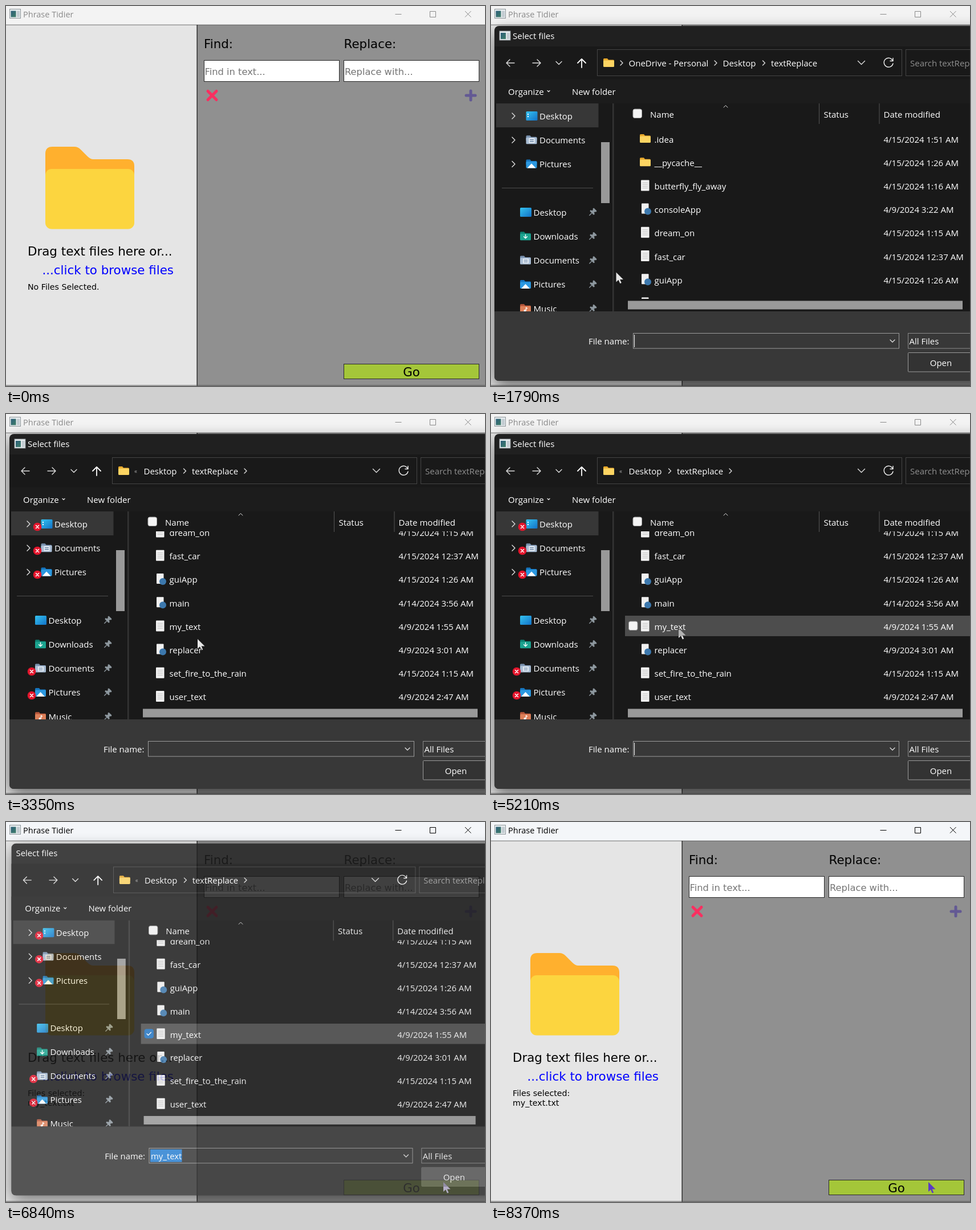
An HTML page that plays this animation: 840 px wide and 667 px high, repeating every 8440 ms.

```html
<!DOCTYPE html>
<html lang="en">
<head>
<meta charset="utf-8">
<title>Find and replace demo</title>
<style>
html, body { margin: 0; width: 100%; height: 100%; overflow: hidden; background: #e5e5e5; }
svg { display: block; width: 100vw; height: 100vh; }
.app text { font-family: "DejaVu Sans", sans-serif; font-size: 21.4px; }
.app .hint { font-size: 16.3px; fill: #757575; }
.app .small { font-size: 14.2px; }
.dlg text, .bar text { font-family: "Open Sans", "Noto Sans", sans-serif; font-size: 15px; }
.dlg text { fill: #fff; }
.bar text { font-size: 14.5px; }
.line { fill: none; stroke: #ddd; stroke-width: 1.4; stroke-linecap: round; stroke-linejoin: round; }
#cursor { mix-blend-mode: difference; fill: #fff; }
</style>
</head>
<body>
<svg id="stage" viewBox="0 0 840 667" preserveAspectRatio="none"></svg>
<script>
const LOOP = 8440;
const ROW = 41.2;

const rect = (x, y, w, h, fill, extra = '') =>
  `<rect x="${x}" y="${y}" width="${w}" height="${h}" fill="${fill}" ${extra}/>`;
const text = (x, y, s, extra = '') => `<text x="${x}" y="${y}" ${extra}>${s}</text>`;
const line = (d, extra = '') => `<path class="line" d="${d}" ${extra}/>`;
const group = (id, body, extra = '') => `<g id="${id}" ${extra}>${body}</g>`;
const right = (x, y, s = 4) => line(`M${x - s / 2} ${y - s}l${s} ${s}l${-s} ${s}`);
const down = (x, y, s = 5) => line(`M${x - s} ${y - s / 2}l${s} ${s}l${s} ${-s}`);

const windowIcon = (x, y) =>
  rect(x, y, 19, 16, '#e9eef0', 'stroke="#8d9599"') +
  rect(x + 2, y + 3, 9, 11, 'url(#teal)') + rect(x + 12.5, y + 3, 5, 11, '#c3ccd2');

const folder = (x, y, back = '#e8a92c', front = '#fcd462') =>
  `<path d="M${x} ${y + 1.5}q0-1.5 1.5-1.5h5.5l2 2.5h8.500q1.5 0 1.500 1.500v5h-19z" fill="${back}"/>` +
  rect(x, y + 3.5, 19, 11.500, front, 'rx="1.5"');

const sheet = (x, y) => rect(x, y, 14.5, 19, '#f1f1f1', 'rx="1"') +
  `<path d="M${x + 2.5} ${y + 5}h9.500m-9.500 3h9.500m-9.500 3h9.500m-9.500 3h9.500" stroke="#c2c2c2" fill="none"/>`;

const fileIcon = {
  dir: y => folder(261, y - 9),
  txt: y => sheet(263, y - 11),
  py: y => rect(264, y - 11, 12.500, 18, '#f1f1f1', 'rx="1"') +
    `<circle cx="275" cy="${y + 3}" r="6" fill="#3c78ad"/>`
};

const files = [
  ['dir', '.idea', '15/2024 1:51'], ['dir', '__pycache__', '15/2024 1:26'],
  ['txt', 'butterfly_fly_away', '15/2024 1:16'], ['py', 'consoleApp', '9/2024 3:22'],
  ['txt', 'dream_on', '15/2024 1:15'], ['txt', 'fast_car', '15/2024 12:37'],
  ['py', 'guiApp', '15/2024 1:26'], ['py', 'main', '14/2024 3:56'],
  ['txt', 'my_text', '9/2024 1:55'], ['py', 'replacer', '9/2024 3:01'],
  ['txt', 'set_fire_to_the_rain', '15/2024 1:15'], ['txt', 'user_text', '9/2024 2:47']
];
const PICKED = 8;

const fileRow = ([kind, name, date], i) => {
  const y = 234 + i * ROW;
  return fileIcon[kind](y) + text(286.5, y + 5.5, name) + text(688.5, y + 5.5, `4/${date} AM`);
};

const placeIcon = {
  Desktop: (x, y) => rect(x, y - 8, 20, 16, 'url(#sky)', 'rx="1.5"'),
  Documents: (x, y) => folder(x, y - 8, '#7890ad', '#a9bdd4') +
    rect(x + 5, y - 3, 10, 8, '#eef3f8') + line(`M${x + 7} ${y - .5}h6m-6 3h6`, 'style="stroke:#5f7da0"'),
  Pictures: (x, y) => folder(x, y - 8, '#1574bd', '#2b98e0') +
    `<path d="M${x + 2} ${y + 7}l7.500-8l7.500 8z" fill="#fff"/>`,
  Downloads: (x, y) => folder(x, y - 8, '#0d7f70', '#1ba38f') +
    line(`M${x + 9.5} ${y - 3}v6m-3-2.500l3 3l3-3`, 'style="stroke:#fff"'),
  Music: (x, y) => folder(x, y - 8, '#b5553a', '#dd8059') +
    `<circle cx="${x + 8.5}" cy="${y + 3.5}" r="2" fill="#fff"/>` +
    line(`M${x + 10.5} ${y + 3}v-5l2 1.500`, 'style="stroke:#fff"')
};

const place = (name, x, y) => placeIcon[name](x, y) + text(x + 23.5, y + 5.5, name);
const pin = y => `<g transform="translate(178 ${y}) rotate(45)" fill="#8d979e">` +
  rect(-4, -7, 8, 3, '#8d979e', 'rx="1"') + rect(-2.5, -5, 5, 5, '#8d979e') +
  rect(-5, -1, 10, 3, '#8d979e', 'rx="1"') + rect(-.7, 2, 1.4, 6, '#8d979e') + '</g>';
const badge = (x, y) => `<circle cx="${x}" cy="${y}" r="7.3" fill="#e3152c"/>` +
  line(`M${x - 2.5} ${y - 2.5}l5 5m0-5l-5 5`, 'style="stroke:#fff;stroke-width:1.6"');

const check = (x, y, fill, stroke) => rect(x, y, 15.500, 15.500, fill, `rx="3" stroke="${stroke}"`);

function appWindow() {
  const pane = group('pane',
    '<path d="M69 259q0-12 12-12h39q6 0 11 5l12 12q5 5 10 5h60q12 0 12 12v19h-156z" fill="#ffb02e"/>' +
    rect(69, 286, 156, 105.5, '#fcd53f', 'rx="11"') +
    text(38, 438, 'Drag text files here or...') +
    text(294, 471, '...click to browse files', 'text-anchor="end" style="fill:#00f"') +
    text(38, 498, 'No Files Selected.', 'class="small" id="status"') +
    text(38, 515, 'my_text.txt', 'class="small" id="chosen"'));
  const box = (x, y, h, fill) => rect(x, y, 237, h, fill, 'stroke="#2a2a2a"');
  return '<g class="app">' + rect(0, 33, 335, 634, '#e5e5e5') + rect(335, 33, 505, 634, '#909090') +
    rect(0, 32.5, 840, 1, '#4c4c4c') + rect(334.5, 33, 1.2, 634, '#111') + rect(0, 665.5, 840, 1, '#555') +
    pane + text(347, 74, 'Find:') + text(592.5, 74, 'Replace:') +
    box(347.5, 95.5, 37, '#fff') + box(592.5, 95.5, 37, '#fff') +
    text(348.5, 121, 'Find in text...', 'class="hint"') +
    text(594, 121, 'Replace with...', 'class="hint"') +
    '<path d="M354 149.500l15 15m0-15l-15 15" stroke="#f92f60" stroke-width="5" stroke-linecap="round"/>' +
    '<path d="M807 157h16m-8-8v16" stroke="#635994" stroke-width="5" stroke-linecap="round"/>' +
    box(592.5, 628.5, 26, '#a4c639') + text(711, 649.5, 'Go', 'text-anchor="middle"') + '</g>';
}

function titleBar() {
  return '<g class="bar">' + rect(0, 0, 840, 32.5, '#f3f3f3', 'id="barBg"') + windowIcon(6.5, 5.5) +
    group('barInk', text(30, 20, 'Phrase Tidier', 'fill="currentColor"') +
      '<path d="M682.500 14.500h11M743.500 9.500h10v10h-10zM805 9l10.500 10.500m0-10.500l-10.500 10.500" fill="none" stroke="currentColor"/>') +
    '</g>';
}

function skeleton() {
  return rect(6, 72, 1000, 464, '#fafcfb') + rect(240, 514, 700, 22, '#202020') +
    rect(240, 518, 622, 15, '#999') + rect(172, 577, 70, 22, '#fff') +
    rect(249, 575, 466, 27, '#fff') + rect(731, 575, 240, 26, '#fff') +
    rect(731, 609, 116, 34, '#fff') + rect(862, 609, 116, 34, '#fff');
}

function navPane() {
  const top = ['Desktop', 'Documents', 'Pictures'];
  const pinned = ['Desktop', 'Downloads', 'Documents', 'Pictures', 'Music'];
  return '<g clip-path="url(#navClip)">' + rect(9, 171, 179.5, 42, '#373737') +
    top.map((n, i) => right(39.5, 193 + i * 42.3, 5) + place(n, 61.5, 193 + i * 42.3)).join('') +
    rect(64, 189, 2, 2, '#fff') + rect(64, 193, 2, 2, '#fff') +
    rect(19, 319, 160, 1, '#4c4c4c') +
    pinned.map((n, i) => place(n, 51, 362 + i * 42.3) + pin(362 + i * 42.3)).join('') +
    group('badges', [[55, 198], [55, 240], [55, 282], [45, 452], [45, 494]].map(p => badge(...p)).join('')) +
    rect(193, 239, 15, 107, '#999') + rect(213, 171, 2.5, 365, '#343434') + '</g>';
}

function fileList() {
  return '<g clip-path="url(#listClip)">' + rect(235, 0, 700, 36, '#4d4d4d', 'id="hover"') +
    group('rows', rect(235, 0, 700, 36, '#4d4d4d', `id="picked" transform="translate(0 ${214.6 + PICKED * ROW})"`) +
      files.map(fileRow).join('')) +
    group('box', check(241.5, 0, '#f4f4f4', '#999')) +
    group('tick', check(241.5, 0, '#2275c4', '#2275c4') +
      line('M245.500 8l2.500 2.500l5-5', 'style="stroke:#fff"'), `transform="translate(0 ${224.6 + PICKED * ROW})"`) + '</g>' +
    check(249, 181, '#f4f4f4', '#aaa') + text(279, 195.5, 'Name') + text(583.5, 195.5, 'Status') +
    text(688.5, 195.5, 'Date modified') + line('M408 178l3.500-3.500l3.500 3.500', 'style="stroke-width:1"') +
    rect(575, 171, 1, 36, '#555') + rect(680.5, 171, 1, 36, '#555') + rect(240, 517.5, 587, 15, '#999');
}

function dialog() {
  const field = (x, y, w, h, c, extra = '') => rect(x, y, w, h, 'none', `stroke="${c}" ${extra}`);
  const crumbs =
    group('pathLong', right(229, 100) + text(241.5, 105.5, 'OneDrive - Personal') + right(394, 100) +
      text(406.5, 105.5, 'Desktop') + right(478.5, 100) + text(491, 105.5, 'textReplace')) +
    group('pathShort', text(225, 104, '«', 'style="font-size:10px;fill:#aaa"') + text(241.5, 105.5, 'Desktop') +
      right(313.5, 100) + text(326, 105.5, 'textReplace') + right(420, 100));
  const full = rect(6, 71, 1000, 465, '#191919') + rect(6, 129, 1000, 42, '#1c1c1c') +
    line('M41 100h-14m6-6l-6 6l6 6') + line('M73 100h14m-6-6l6 6l-6 6') + down(119, 100) +
    line('M159 108v-15m-7 7l7-7l7 7', 'style="stroke:#fff;stroke-width:1.8"') +
    field(186.5, 76.5, 534, 46, '#454545') + field(727.5, 76.5, 300, 46, '#454545') +
    folder(197, 92) + crumbs + down(649.5, 99.5, 6) +
    line('M704.500 96a8 8 0 1 0 .5 5M705 91.500v5h-5', 'style="stroke:#eee"') +
    text(735, 105.5, 'Search textReplace', 'style="fill:#8f8f8f"') +
    text(30, 155.5, 'Organize') + down(101, 149.5, 2) + text(142, 155.5, 'New folder') +
    navPane() + fileList() +
    text(242.5, 594, 'File name:', 'text-anchor="end"') + field(249.5, 574.5, 466, 26.5, '#9b9b9b') +
    down(704, 588, 4) + rect(251, 577, 1, 22, '#fff', 'id="caret"') +
    group('typed', rect(251.5, 576.5, 56, 22.5, '#2b83d6') + text(252.5, 594, 'my_text')) +
    field(731.5, 574.5, 240, 26.5, '#8a8a8a') + text(733.5, 594, 'All Files') +
    rect(731.5, 608.5, 115, 33.5, '#333', 'id="open" stroke="#9b9b9b" rx="1"') +
    text(789, 631.5, 'Open', 'text-anchor="middle"');
  return group('dialog',
    rect(6, 45, 1000, 623, '#000', 'rx="10" opacity=".55" filter="url(#blur)"') +
    group('frame', rect(6, 35, 1000, 623, '#202020', 'rx="8"')) +
    group('footer', '<path d="M6 536h1000v122h-992q-8 0-8-8z" fill="#383838"/>') +
    group('dlgIcon', windowIcon(15, 44)) + text(38, 58, 'Select files', 'id="dlgTitle"') +
    group('blank', skeleton()) + group('full', full), 'class="dlg"');
}

const svg = document.getElementById('stage');
svg.innerHTML = `<defs>
  <linearGradient id="teal" x2="1" y2="1"><stop stop-color="#2d5f7c"/><stop offset="1" stop-color="#3f7f68"/></linearGradient>
  <linearGradient id="sky" x2="1" y2="1"><stop stop-color="#35c3f0"/><stop offset="1" stop-color="#1272c8"/></linearGradient>
  <filter id="blur" x="-10%" y="-15%" width="120%" height="130%"><feGaussianBlur stdDeviation="14"/></filter>
  <clipPath id="navClip"><rect x="6" y="171" width="212" height="365"/></clipPath>
  <clipPath id="listClip"><rect x="230" y="206" width="800" height="308"/></clipPath>
</defs>` + appWindow() + titleBar() + dialog() +
  '<path id="cursor" d="M0 0V17L4 13.300L6.800 19.500L9.300 18.400L6.600 12.400H12.500Z"/>';

const ui = {};
svg.querySelectorAll('[id]').forEach(el => ui[el.id] = el);

const clamp = v => Math.max(0, Math.min(1, v));
const smooth = p => p * p * (3 - 2 * p);
const show = (el, on) => el.style.display = on ? '' : 'none';
const move = (el, x, y) => el.setAttribute('transform', `translate(${x} ${y})`);

// time, x, y of the pointer tip
const track = [
  [70, 664, 655], [940, 219.5, 467.5], [2380, 219.5, 467.5], [3080, 336, 395],
  [4850, 336, 395], [5200, 329, 376], [5650, 329, 376], [6570, 767, 632], [LOOP, 767, 632]
];

function pointer(t) {
  let i = 1;
  while (i < track.length - 1 && t > track[i][0]) i++;
  const [a, b] = [track[i - 1], track[i]];
  const p = smooth(clamp((t - a[0]) / (b[0] - a[0])));
  return [a[1] + (b[1] - a[1]) * p, a[2] + (b[2] - a[2]) * p];
}

function drawList(t, x, y) {
  const scroll = t < 3280 ? 0 : t < 3350 ? 123.6 : 190.2;
  const done = t >= 5480;
  const still = t >= 3280 && t < 4880;
  const i = Math.floor((y + scroll - 214) / ROW);
  const over = !still && x >= 235 && y > 206 && y < 514 && i < files.length;
  const top = 214.6 + i * ROW - scroll;
  move(ui.rows, 0, -scroll);
  move(ui.hover, 0, top);
  move(ui.box, 0, top + 10);
  move(ui.tick, 0, 224.6 + PICKED * ROW - scroll);
  show(ui.hover, over);
  show(ui.box, over && !(done && i === PICKED));
  show(ui.picked, done);
  show(ui.tick, done);
  show(ui.typed, done);
  show(ui.caret, !done && Math.floor((t - 1700) / 530) % 2 === 0);
}

function drawDialog(t, x, y) {
  const on = t >= 1530 && t < 7040;
  show(ui.dialog, on);
  if (!on) return;
  const opening = clamp((t - 1500) / 230), closing = clamp((t - 6800) / 240);
  const scale = closing ? 1 - .05 * closing : 1 - .2 * (1 - opening) ** 3;
  const cx = 421, cy = closing ? 345 : 300;
  ui.dialog.setAttribute('transform',
    `translate(${cx * (1 - scale)} ${cy * (1 - scale)}) scale(${scale})`);
  ui.dialog.setAttribute('opacity', closing ? 1 - closing : clamp(opening * 1.4));
  const ready = t >= 1660;
  show(ui.blank, !ready);
  show(ui.full, ready);
  show(ui.footer, ready);
  const leaving = t >= 6800;
  show(ui.dlgIcon, !leaving);
  ui.dlgTitle.setAttribute('x', leaving ? 14 : 38);
  show(ui.pathLong, t < 2050);
  show(ui.pathShort, t >= 2050);
  show(ui.badges, t >= 2450);
  const hot = x > 731 && y > 608;
  ui.open.setAttribute('fill', hot ? '#626262' : '#333');
  ui.open.setAttribute('stroke', hot ? '#6c6c6c' : '#9b9b9b');
  drawList(t, x, y);
}

function draw(t) {
  const [x, y] = pointer(t);
  const loaded = t >= 6760;
  const active = loaded || (t >= 980 && t < 1320);
  ui.barBg.setAttribute('fill', active ? '#f4f6f9' : '#f3f3f3');
  ui.barInk.style.color = active ? '#000' : '#8a8a8a';
  move(ui.pane, 0, loaded ? -17 : 0);
  ui.status.textContent = loaded ? 'Files selected:' : 'No Files Selected.';
  show(ui.chosen, loaded);
  drawDialog(t, x, y);
  show(ui.cursor, t >= 70);
  move(ui.cursor, x, y);
}

const start = performance.now();
function tick() {
  draw((performance.now() - start) % LOOP);
  requestAnimationFrame(tick);
}
tick();
</script>
</body>
</html>
```
